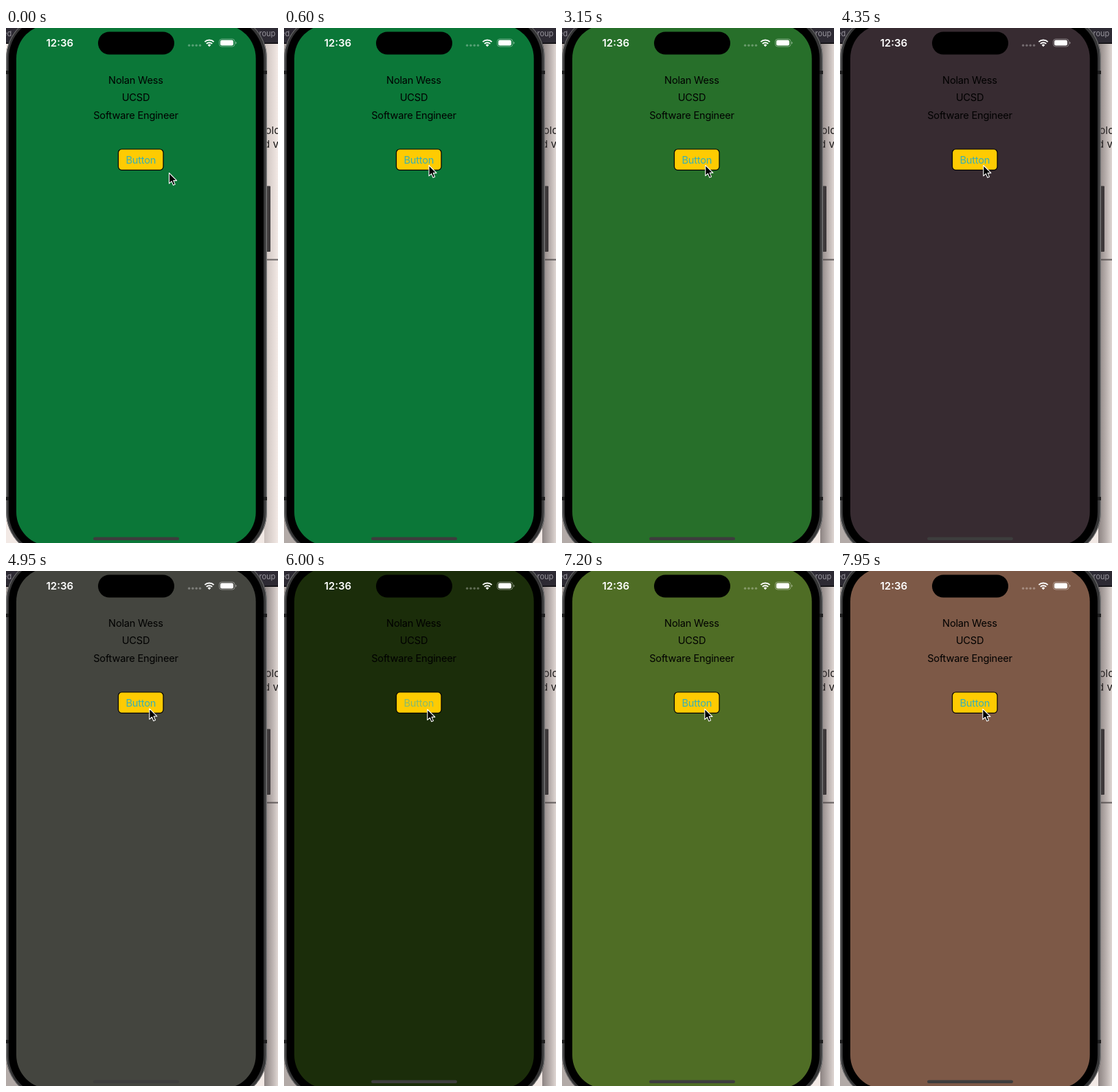
An HTML page for the animation above (8000 ms loop, 396x748 px).

```html
<!DOCTYPE html>
<html lang="en">
<head>
<meta charset="utf-8">
<title>Colour button</title>
<style>
  html, body { margin: 0; width: 100%; height: 100%; overflow: hidden; background: #eee5e1; }
  svg { display: block; width: 396px; height: 748px; }
  text { font-family: Inter, "Liberation Sans", sans-serif; }
  .label { font-size: 14.6px; letter-spacing: -.2px; text-anchor: middle; }
</style>
</head>
<body>
<svg viewBox="0 0 396 748">
  <defs>
    <linearGradient id="soft">
      <stop offset="0" stop-color="#6b5c58" stop-opacity=".3"/>
      <stop offset="1" stop-color="#6b5c58" stop-opacity="0"/>
    </linearGradient>
    <linearGradient id="deep">
      <stop offset="0" stop-color="#3a3436" stop-opacity=".42"/>
      <stop offset="1" stop-color="#3a3436" stop-opacity=".1"/>
    </linearGradient>
    <linearGradient id="edge">
      <stop offset="0" stop-color="#626263"/>
      <stop offset=".008" stop-color="#353536"/>
      <stop offset=".992" stop-color="#353536"/>
      <stop offset="1" stop-color="#6e6e6f"/>
    </linearGradient>
  </defs>

  <!-- windows behind the phone -->
  <rect width="396" height="748" fill="#f2e9e5"/>
  <rect width="396" height="22" fill="#2d2a33"/>
  <rect y="21.5" width="396" height="1.5" fill="#0c0b0e"/>
  <g font-size="11" fill="#98959d">
    <text x="-5" y="12">ed</text>
    <text x="368.5" y="12">roup</text>
  </g>
  <g font-size="15" fill="#111">
    <text x="377.5" y="154">old</text>
    <text x="375" y="173.5">d v</text>
  </g>
  <rect x="370" y="229.5" width="15" height="95.5" rx="1" fill="#343335"/>
  <rect x="370" y="335.5" width="26" height="2" fill="#6c6766"/>
  <rect x="376" y="23" width="20" height="725" fill="url(#soft)"/>
  <g id="shade">
    <rect x="376" y="23" width="20" height="725" fill="url(#deep)"/>
    <rect y="23" width="30" height="725" fill="#3a3436" opacity=".35"/>
  </g>

  <!-- phone -->
  <rect x="0" y="-20" width="380" height="787" rx="64" fill="url(#edge)"/>
  <rect x=".5" y="-19.5" width="379" height="786" rx="63.5" fill="none" stroke="#777778"/>
  <path d="M0 62h4v5H0zM375 62h5v5h-5zM0 681h4v5H0zM375 681h5v5h-5z" fill="#1e1e1f"/>
  <rect x="4" y="-16" width="371" height="779" rx="60"/>
  <rect id="screen" x="15" y="-5" width="348.7" height="757" rx="49"/>
  <rect x="134" y="5.5" width="111" height="33" rx="16.5"/>
  <rect x="127" y="739.5" width="125" height="4.6" rx="2.3" fill="#3d3d3d"/>

  <!-- status bar -->
  <text x="78.3" y="27" font-size="15" font-weight="600" text-anchor="middle" fill="#fff">12:36</text>
  <g fill="#fff">
    <g id="dots" opacity=".3"></g>
    <path d="M296 27.2l-2.4-2.5a3.5 3.5 0 0 1 4.8 0z"/>
    <g fill="none" stroke="#fff" stroke-width="2">
      <path d="M291.8 22.9a6 6 0 0 1 8.4 0"/>
      <path d="M289.4 20.1a9.4 9.4 0 0 1 13.2 0"/>
    </g>
    <rect x="310.5" y="16" width="22.5" height="11" rx="3.6" fill="none" stroke="#fff" opacity=".4"/>
    <rect x="312" y="17.5" width="19" height="8" rx="2.2"/>
    <path d="M334.2 19.8q1.4.4 1.4 1.8t-1.4 1.8z" opacity=".45"/>
  </g>

  <g class="label">
    <text x="189" y="80.5">Nolan Wess</text>
    <text x="189" y="106.2">UCSD</text>
    <text x="189" y="132">Software Engineer</text>
    <rect x="163.5" y="176" width="65.5" height="30.3" rx="5" fill="#fecb02" stroke="#000" stroke-width="1.2"/>
    <text id="caption" x="196.3" y="196.5" fill="#35b0b9">Button</text>
  </g>

  <path id="cursor" d="M0 0V15.4L3.6 12.1 6 17.8 8.7 16.6 6.3 11.1H11.1z"
        fill="#000" stroke="#fff" stroke-width="1.1" stroke-linejoin="round"/>
</svg>

<script>
const LOOP = 8000, STEP = 150;
const $ = id => document.getElementById(id);

// [start ms, value]
const colors = [
  [0, '#0b7738'], [1350, '#25446f'], [2250, '#4a4a3c'], [3000, '#276f2a'],
  [3600, '#35503a'], [4200, '#372b31'], [4800, '#44453f'], [5400, '#2f4038'],
  [6000, '#1b2d0a'], [6600, '#3c4a2c'], [7050, '#4f6d25'], [7800, '#7d5947']
];
const presses = [1200, 2850];
// [ms, x, y] of the pointer tip
const path = [
  [0, 237.5, 210.5], [600, 211, 199.5], [1200, 210.5, 199], [1650, 209.8, 199],
  [3150, 208.8, 199.3], [4350, 208.8, 199.5], [6000, 208.8, 201],
  [7200, 207.8, 200.3], [LOOP, 207.8, 200.3]
];

for (let i = 0; i < 4; i++) {
  $('dots').innerHTML += `<circle cx="${266.6 + i * 5.3}" cy="25.2" r="1.7"/>`;
}

const latest = t => colors.filter(c => c[0] <= t).pop();

function pointer(t) {
  const i = path.findIndex(p => p[0] > t);
  const [t0, x0, y0] = path[i - 1], [t1, x1, y1] = path[i];
  const k = (t - t0) / (t1 - t0), e = k * k * (3 - 2 * k);
  return [x0 + (x1 - x0) * e, y0 + (y1 - y0) * e];
}

function captionAlpha(t, since) {
  if (presses.some(p => t >= p && t < p + STEP)) return .3;
  return since > 0 && t - since < STEP ? .6 : 1;
}

function draw(ms) {
  const t = Math.floor(ms / STEP) * STEP;
  const [since, color] = latest(t);
  $('screen').setAttribute('fill', color);
  $('caption').setAttribute('opacity', captionAlpha(t, since));
  $('shade').setAttribute('opacity', Math.min(1, Math.max(0, (t - 300) / 300)));
  $('cursor').setAttribute('transform', `translate(${pointer(t)})`);
}

const start = performance.now();
function tick() {
  draw((performance.now() - start) % LOOP);
  requestAnimationFrame(tick);
}
tick();
</script>
</body>
</html>
```
